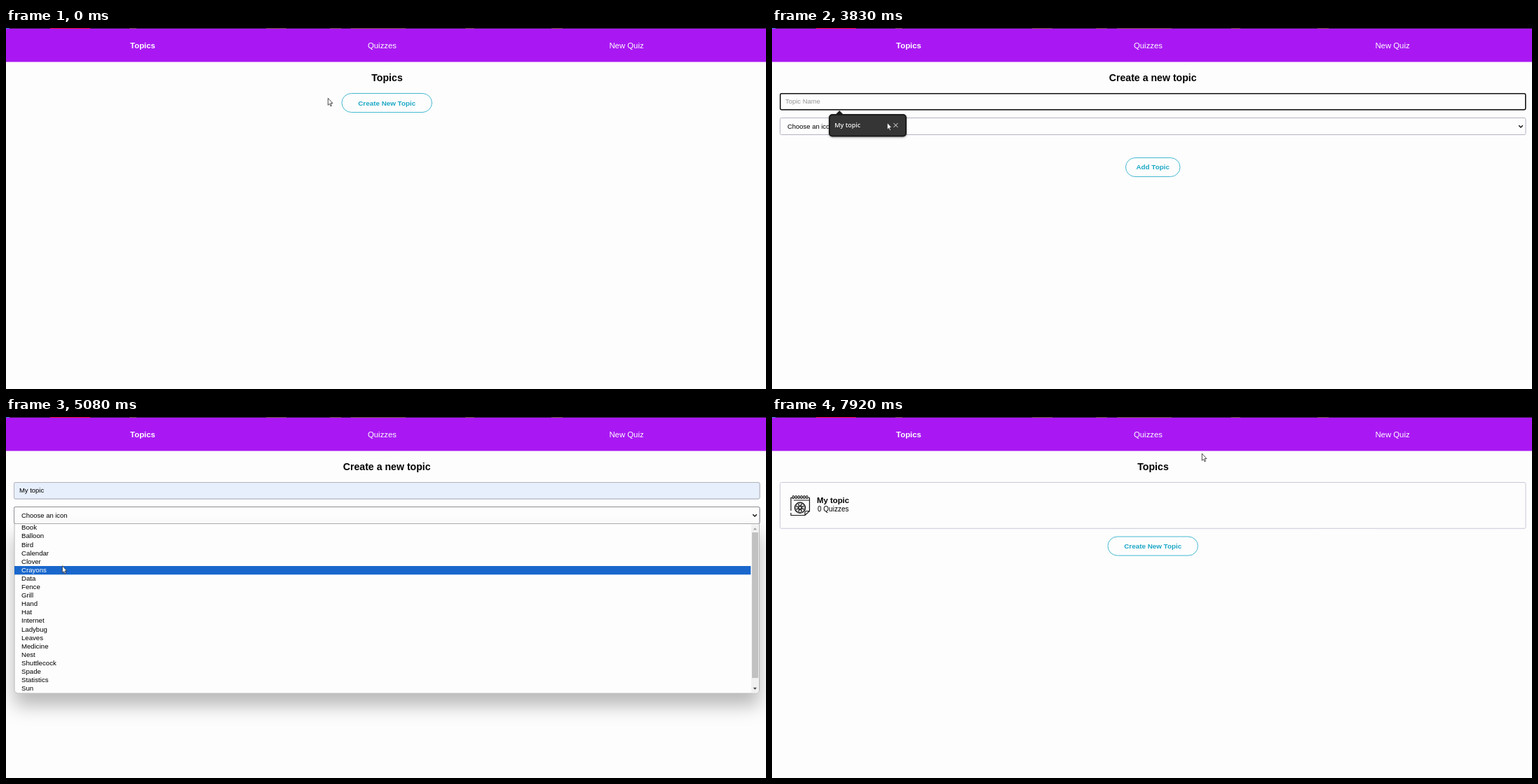
These frames come from a looping animation (1084 by 516 pixels, 8 s). An HTML page:

```html
<!DOCTYPE html>
<html lang="en">
<head>
<meta charset="utf-8">
<title>Topics</title>
<style>
html, body { margin: 0; width: 100%; height: 100%; overflow: hidden; background: #fdfdfd; }
svg { display: block; width: 1084px; height: 516px; }
text { font-family: "Liberation Sans", Arial, sans-serif; font-size: 9.45px; }
.nav { font-size: 11.36px; fill: #fff; text-anchor: middle; }
.title { font-size: 14.15px; font-weight: 700; text-anchor: middle; }
.bold { font-weight: 700; }
.button rect { fill: #fdfdfd; stroke: #45b8d2; }
.button text { font-size: 9.85px; font-weight: 700; fill: #1ba7c6; text-anchor: middle; }
.ui { font-family: "Open Sans", "Noto Sans", sans-serif; }
.field { fill: none; stroke: #b4b4c4; }
.focus { fill: none; stroke: #111; stroke-width: 1.5; }
#names text { font-size: 9.65px; }

/* Time runs in 96 steps of 1/12 s */
.anim { animation: 8s step-end -10ms infinite; }
#list { animation-name: list; }
#form { animation-name: form; }
#done { animation-name: done; }
#status { animation-name: status; }
#hint { animation-name: hint; }
#filled { animation-name: filled; }
#nameFocus { animation-name: nameFocus; }
#menu { animation-name: menu; }
#iconFocus, #picked { animation-name: picked; }
#unpicked { animation-name: unpicked; }
#popup { animation-name: popup; }
#row { animation-name: row; }
#cursor { animation-name: move; }
#arrow { animation-name: arrow; }
#hand { animation-name: hand; }
#beam { animation-name: beam; }

@keyframes list { 0% { opacity: 1 } 12.5%, 100% { opacity: 0 } }
@keyframes form { 0% { opacity: 0 } 12.5% { opacity: 1 } 87.5%, 100% { opacity: 0 } }
@keyframes done { 0% { opacity: 0 } 87.5%, 100% { opacity: 1 } }
@keyframes status { 0% { opacity: 0 } 7.29% { opacity: 1 } 22.92%, 100% { opacity: 0 } }
@keyframes hint { 0% { opacity: 1 } 52.08%, 100% { opacity: 0 } }
@keyframes filled { 0% { opacity: 0 } 52.08%, 100% { opacity: 1 } }
@keyframes nameFocus { 0% { opacity: 0 } 29.17% { opacity: 1 } 56.25%, 100% { opacity: 0 } }
@keyframes popup { 0% { opacity: 0 } 31.25% { opacity: 1 } 52.08%, 100% { opacity: 0 } }
@keyframes menu { 0% { opacity: 0 } 56.25% { opacity: 1 } 75%, 100% { opacity: 0 } }
@keyframes picked { 0% { opacity: 0 } 75%, 100% { opacity: 1 } }
@keyframes unpicked { 0% { opacity: 1 } 75%, 100% { opacity: 0 } }
@keyframes row {
  0% { transform: translateY(-400px) }
  59.37% { transform: translateY(12.1px) }
  60.42% { transform: translateY(24.2px) }
  61.46% { transform: translateY(36.3px) }
  62.5% { transform: translateY(48.4px) }
  63.54% { transform: translateY(60.5px) }
  70.83% { transform: translateY(48.4px) }
  71.87%, 100% { transform: translateY(36.3px) }
}
@keyframes arrow {
  0% { opacity: 1 } 6.25% { opacity: 0 } 41.67% { opacity: 1 }
  82.29% { opacity: 0 } 92.71%, 100% { opacity: 1 }
}
@keyframes hand {
  0% { opacity: 0 } 6.25% { opacity: 1 } 12.5% { opacity: 0 }
  82.29% { opacity: 1 } 92.71%, 100% { opacity: 0 }
}
@keyframes beam { 0% { opacity: 0 } 12.5% { opacity: 1 } 41.67%, 100% { opacity: 0 } }
@keyframes move {
  0% { transform: translate(459px, 100px) }
  4.17% { transform: translate(459px, 100px); animation-timing-function: steps(5) }
  9.37% { transform: translate(538px, 107px) }
  21.87% { transform: translate(538px, 107px); animation-timing-function: steps(7) }
  29.17% { transform: translate(97px, 106px) }
  37.5% { transform: translate(97px, 106px); animation-timing-function: steps(7) }
  44.79% { transform: translate(164px, 135px) }
  48.96% { transform: translate(164px, 135px); animation-timing-function: steps(3) }
  52.08% { transform: translate(110px, 139px) }
  56.25% { transform: translate(110px, 139px); animation-timing-function: steps(2) }
  58.33% { transform: translate(90px, 165px); animation-timing-function: steps(5) }
  63.54% { transform: translate(80px, 212.5px); animation-timing-function: steps(5) }
  68.75% { transform: translate(78px, 222px); animation-timing-function: steps(4) }
  72.92% { transform: translate(75px, 193px) }
  76.04% { transform: translate(75px, 193px); animation-timing-function: steps(6) }
  82.29% { transform: translate(564px, 190.5px) }
  91.67% { transform: translate(564px, 190.5px); animation-timing-function: steps(6) }
  97.92%, 100% { transform: translate(613px, 52px) }
}
</style>
</head>
<body>
<svg viewBox="0 0 1084 516">
  <defs>
    <filter id="shadow" x="-10%" y="-20%" width="120%" height="150%">
      <feDropShadow dx="0" dy="17" stdDeviation="13" flood-opacity=".27"/>
    </filter>
    <filter id="glow" x="-10%" y="-20%" width="120%" height="150%">
      <feDropShadow dx="0" dy="1" stdDeviation="1.5" flood-opacity=".35"/>
    </filter>
    <clipPath id="hit"><rect id="row" class="anim" x="12" y="152.6" width="1050.5" height="12.1"/></clipPath>
  </defs>

  <rect width="1084" height="516" fill="#fdfdfd"/>
  <rect width="1084" height="48.5" fill="#a918f3"/>
  <g id="strip">
    <path d="M0 .5H1084" stroke="#2a1630"/>
    <path d="M0 .5H5" stroke="#2f86d8"/>
    <path d="M63 .5H120" stroke="#e0102a"/>
    <path d="M176 .5H186M371 .5H400M462 .5H478M492 .5H570M655 .5H668M778 .5H794" stroke="#63502c"/>
  </g>
  <text class="nav bold" x="195" y="29">Topics</text>
  <text class="nav" x="536.5" y="29">Quizzes</text>
  <text class="nav" x="885" y="29">New Quiz</text>

  <g id="list" class="anim">
    <text class="title" x="543.5" y="76">Topics</text>
    <g id="create" class="button">
      <rect x="479" y="93.5" width="128.5" height="27" rx="13.5"/>
      <text x="543.2" y="110.5">Create New Topic</text>
    </g>
  </g>

  <g id="form" class="anim">
    <text class="title" x="543.2" y="76">Create a new topic</text>
    <rect class="field" x="11.5" y="93.5" width="1063.5" height="23.5" rx="2"/>
    <text id="hint" class="anim" x="19" y="108.3" fill="#949494">Topic Name</text>
    <g id="filled" class="anim">
      <rect x="11.5" y="93.5" width="1063.5" height="23.5" rx="2" fill="#e7effc" stroke="#b0b3bd"/>
      <text x="19" y="108.3">My topic</text>
    </g>
    <rect id="nameFocus" class="focus anim" x="11.75" y="93.75" width="1063" height="23" rx="2"/>

    <rect class="field" x="11.5" y="128.5" width="1063.5" height="24" rx="2"/>
    <text id="unpicked" class="anim" x="22" y="143.8">Choose an icon</text>
    <text id="picked" class="anim" x="22" y="143.8">Calendar</text>
    <path d="M1065.2 139.3l2.8 2.8 2.8-2.8" fill="none" stroke="#111" stroke-width="1.4"/>
    <rect id="iconFocus" class="focus anim" x="11.75" y="128.75" width="1063" height="23.5" rx="2"/>

    <g class="button">
      <rect x="504.5" y="185.5" width="77.5" height="27" rx="13.5"/>
      <text x="543.2" y="202">Add Topic</text>
    </g>

    <g id="popup" class="anim">
      <g filter="url(#glow)">
        <path d="M90.5 124l5.7-6 5.7 6z" fill="#1d1d1d"/>
        <rect x="82" y="124" width="109" height="30.5" rx="4" fill="#343434" stroke="#1b1b1b" stroke-width="2"/>
      </g>
      <text class="ui" x="89.2" y="142.3" fill="#f2f2f2" style="font-size:9px;font-weight:600">My topic</text>
      <path d="M173.5 136l6 6m0-6l-6 6" stroke="#e8e8e8"/>
    </g>

    <g id="menu" class="anim">
      <rect x="11.5" y="128.5" width="1063.5" height="24" rx="2" fill="none" stroke="#8f8f95"/>
      <path d="M12 152.5H1074.5V390a5 5 0 0 1-5 5H17a5 5 0 0 1-5-5Z" fill="#fdfdfd" stroke="#a5a5a5" stroke-width=".8" filter="url(#shadow)"/>
      <path d="M1063 153H1074V390a4.500 4.500 0 0 1-4.500 4.500H1063Z" fill="#f1f1f1"/>
      <rect x="1064" y="165" width="9" height="208" fill="#c1c1c1"/>
      <path d="M1065.700 161.300l2.600-3 2.600 3z" fill="#a0a0a0"/>
      <path d="M1065.700 386.700l2.600 3 2.600-3z" fill="#444"/>
      <g id="names"></g>
      <g clip-path="url(#hit)">
        <rect x="12" y="152" width="1050.5" height="243" fill="#1967cc"/>
        <use href="#names" fill="#fff"/>
      </g>
    </g>
  </g>

  <g id="done" class="anim">
    <text class="title" x="543.5" y="76">Topics</text>
    <rect x="11.5" y="93.5" width="1063.5" height="65.800" rx="2" fill="none" stroke="#c9c9da"/>
    <g fill="none" stroke="#161616" stroke-width="1.2">
      <path d="M27 134V115.500H29M51.500 115.500H53.500V134.500L47 140.500H27V137M31 119H53M47 140.500V136.500Q47 134.500 49 134.500H53.500"/>
      <g id="rings"></g>
      <circle cx="40" cy="129.700" r="7.600"/>
      <circle cx="40" cy="129.700" r="2"/>
      <g id="petals" stroke-width=".9"></g>
    </g>
    <text class="bold" x="64" y="122.800" style="font-size:11.36px">My topic</text>
    <text x="65" y="134.700" style="font-size:10px">0 Quizzes</text>
    <use href="#create" y="77.500"/>
  </g>

  <g id="status" class="anim">
    <path d="M0 502H104a2.500 2.500 0 0 1 2.500 2.500V516H0Z" fill="#0c0c0c"/>
    <text class="ui" x="3" y="512.800" fill="#8d8d8d" style="font-size:8.05px">localhost:3000/topics/new</text>
  </g>

  <g id="cursor" class="anim">
    <path id="arrow" class="anim" d="M.3.3V10.300L2.500 8.200 4 11.700 5.500 11.100 4 7.600H7Z" fill="#fff" stroke="#222" stroke-width=".8"/>
    <g id="hand" class="anim" stroke="#222" stroke-width=".8" stroke-linejoin="round">
      <path d="M-1.200 8.300V1Q-1.200 0 0 0T1.200 1V5Q1.400 4.200 2.300 4.400T3.200 5.300Q4 4.700 4.600 5.500Q5.800 5.200 6 6.500V9.500Q6 11 5 13H-.800Q-1.500 11.200-3.300 9Q-4.300 7.600-3.500 7.100T-1.200 8.300Z" fill="#fff"/>
      <path d="M1.200 5V7.300M3.200 5.300V7.400M4.800 5.800V7.500" fill="none"/>
    </g>
    <path id="beam" class="anim" d="M-2-4.500H-.700Q0-4.500 0-4 0-4.500.700-4.500H2M0-4V4M-2 4.500H-.700Q0 4.500 0 4 0 4.500.700 4.500H2" fill="none" stroke="#222" stroke-width=".9"/>
  </g>
</svg>
<script>
const fill = (id, count, part) => {
  document.getElementById(id).innerHTML = Array.from({ length: count }, (_, i) => part(i)).join('');
};
const icons = ('Book Balloon Bird Calendar Clover Crayons Data Fence Grill Hand Hat Internet ' +
  'Ladybug Leaves Medicine Nest Shuttlecock Spade Statistics Sun').split(' ');

fill('names', icons.length, i => `<text x="22" y="${161.3 + 12.1 * i}">${icons[i]}</text>`);
fill('rings', 6, i => `<ellipse cx="${30.3 + 3.9 * i}" cy="114.5" rx="1.3" ry="2"/>`);
fill('petals', 8, i =>
  `<path d="M40 127.700Q36.500 123.500 40 122.500T40 127.700" transform="rotate(${45 * i} 40 129.700)"/>`);
</script>
</body>
</html>
```
